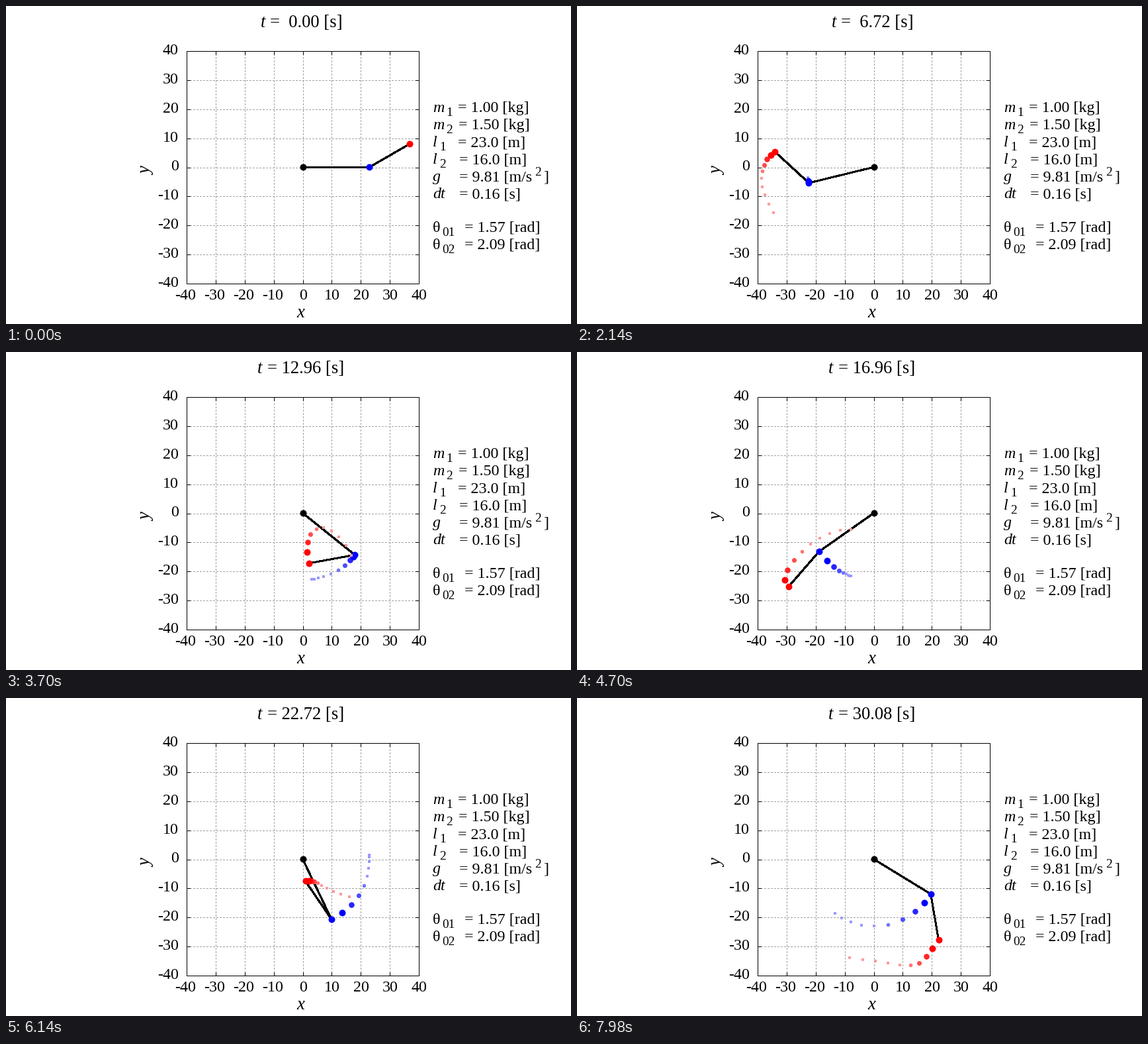
Animation, 854 px wide and 480 px high, one loop 8000 ms. Source, as a matplotlib script:

```python
import numpy as np
import matplotlib.pyplot as plt
from matplotlib.animation import FuncAnimation

W, H, DPI = 854, 480, 64
PT = 72 / DPI                       # points per pixel
LEFT, TOP, SIDE = 273, 68, 351
SCALE = SIDE / 80
CX, CY = LEFT + SIDE / 2, TOP + SIDE / 2 - 0.25

M1, M2, L1, L2, G, DT = 1.0, 1.5, 23.0, 16.0, 9.81, 0.16
STEPS, TRAIL = 188, 10

plt.rcParams["font.family"] = "Liberation Serif"


def slope(s):
    a, b, u, v = s
    d = a - b
    c, n = np.cos(d), np.sin(d)
    den = M1 + M2 * n * n
    du = (-M2 * n * (L1 * u * u * c + L2 * v * v)
          - G * ((M1 + M2) * np.sin(a) - M2 * np.sin(b) * c)) / (L1 * den)
    dv = (n * ((M1 + M2) * L1 * u * u + M2 * L2 * v * v * c)
          + G * (M1 + M2) * (np.sin(a) * c - np.sin(b))) / (L2 * den)
    return np.array([u, v, du, dv])


def rk4(s):
    k1 = slope(s)
    k2 = slope(s + DT / 2 * k1)
    k3 = slope(s + DT / 2 * k2)
    k4 = slope(s + DT * k3)
    return s + DT / 6 * (k1 + 2 * k2 + 2 * k3 + k4)


def solve():
    s = np.array([np.pi / 2, 2 * np.pi / 3, 0, 0])
    states = [s]
    for _ in range(STEPS):
        s = rk4(s)
        states.append(s)
    a, b = np.array(states).T[:2]
    p = np.column_stack([CX + SCALE * L1 * np.sin(a), CY + SCALE * L1 * np.cos(a)])
    q = p + SCALE * L2 * np.column_stack([np.sin(b), np.cos(b)])
    return p, q


P, Q = solve()

fig = plt.figure(figsize=(W / DPI, H / DPI), dpi=DPI, facecolor="white")
ax = fig.add_axes([0, 0, 1, 1])
ax.set_xlim(0, W)
ax.set_ylim(H, 0)
ax.axis("off")


def text(x, y, s, size=24, italic=False, **kw):
    style = "italic" if italic else "normal"
    return ax.text(x, y, s, fontsize=size * PT, style=style, **kw)


def stroke(x, y, width=1, color="black", **kw):
    return ax.plot(x, y, color=color, lw=width * PT, antialiased=False,
                   solid_capstyle="butt", **kw)[0]


def dot(x, y, mark, r, color, z):
    return ax.plot(x, y, mark, ms=2 * r * PT, color=color, mew=0,
                   antialiased=False, zorder=z)[0]


def draw_frame():
    right, bottom = LEFT + SIDE, TOP + SIDE
    for i in range(9):
        v = 10 * i - 40
        x = LEFT + i * SIDE / 8
        y = bottom - i * SIDE / 8
        text(x + (-1.5 if v < 0 else 0.5), 443, str(v), ha="center")
        text(260.5, y + 5, str(v), ha="right")
        if 0 < i < 8:
            dots = dict(color="#a0a0a0", ls=(0, (2, 2)))
            stroke([x, x], [bottom, TOP], **dots)
            stroke([LEFT, right], [y, y], **dots)
            for end, d in ((TOP, 5), (bottom, -5)):
                stroke([x, x], [end, end + d])
            for end, d in ((LEFT, 5), (right, -5)):
                stroke([end, end + d], [y, y])
    stroke([LEFT, right, right, LEFT, LEFT], [TOP, TOP, bottom, bottom, TOP],
           solid_joinstyle="miter")
    text(445, 470, "x", 26.67, True, ha="center")
    text(213, 249, "y", 26.67, True, ha="center", va="center", rotation=90)


def draw_params():
    rows = [("m", "1", 683, "1.00 [kg]"), ("m", "2", 684.5, "1.50 [kg]"),
            ("l", "1", 683, "23.0 [m]"), ("l", "2", 685, "16.0 [m]"),
            ("g", "", 685, "9.81 [m/s"), ("dt", "", 685, "0.16 [s]")]
    for i, (name, sub, x, value) in enumerate(rows):
        y = 160 + 26 * i
        text(645, y, name, italic=True)
        text(665.5 if name == "m" else 655, y + 6, sub, 19.2)
        text(x, y, "= " + value)
    text(799.5, 256, "2", 19.2)
    text(812, 264, "]")
    for y, sub, value in ((341, "01", "1.57"), (367, "02", "2.09")):
        text(645, y, "θ")
        text(659, y + 6, sub, 19.2)
        text(693, y, f"= {value} [rad]")


draw_frame()
draw_params()
clock_t = text(0, 32, "t", 26.67, True)
clock = text(0, 32, "", 26.67)
rods = stroke([], [], 2, zorder=3, snap=False)

age = np.arange(TRAIL)[::-1]
radius = np.clip(5.8 - 0.75 * age, 2, 5)
fade = np.clip(0.15 * (age - 1), 0, 0.6)


def make_trail(hue):
    colors = [tuple(h + (1 - h) * f for h in hue) for f in fade]
    return [dot([], [], "s" if a > 4 else "o", r, c, 4)
            for a, r, c in zip(age, radius, colors)]


blue = make_trail((0, 0, 1))
red = make_trail((1, 0, 0))
dot([CX], [CY], "o", 5, "black", 5)


def update(k):
    ms = 20 * k
    n = 0 if ms < 500 else 1 + (ms - 500) // 40
    x = 384.5 if n * DT < 10 else 380
    clock_t.set_x(x)
    clock.set_x(x + 14.6)
    clock.set_text(f"= {n * DT:5.2f} [s]")
    rods.set_data([CX, P[n, 0], Q[n, 0]], [CY, P[n, 1], Q[n, 1]])
    for dots, path in ((blue, P), (red, Q)):
        for d, a in zip(dots, age):
            d.set_data(*([[v] for v in path[n - a]] if n >= a else ([], [])))
    return [clock_t, clock, rods, *blue, *red]


anim = FuncAnimation(fig, update, frames=400, interval=20, repeat=True,
                     repeat_delay=0, blit=False)
plt.show()
```
